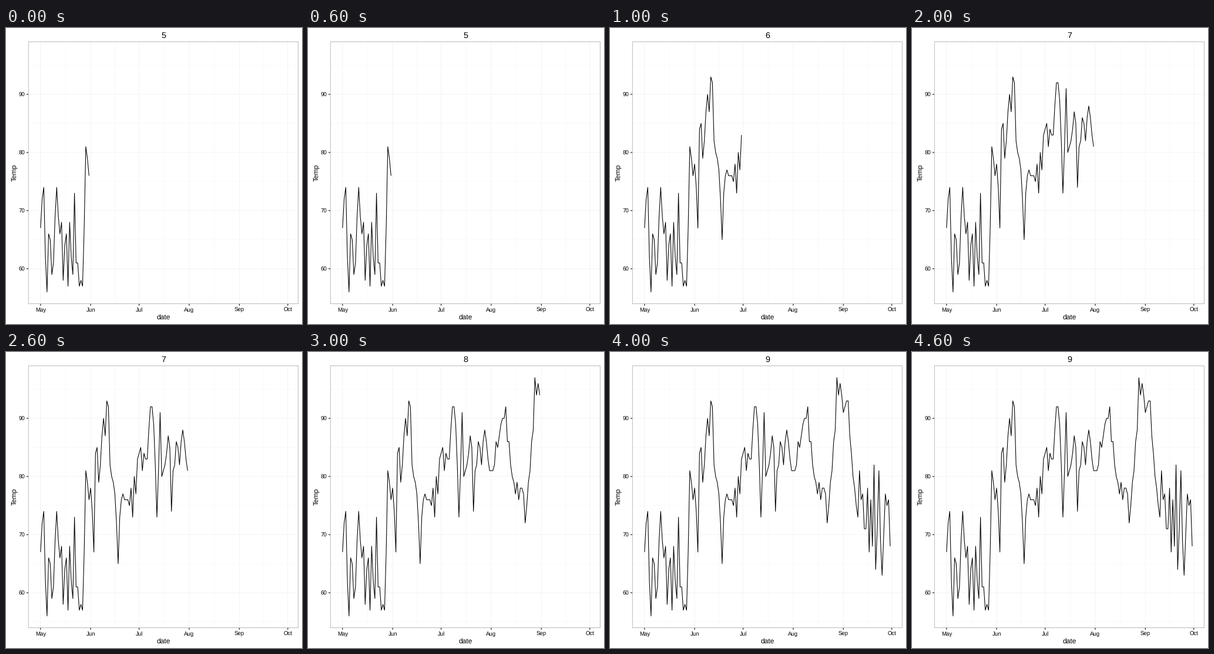
Recreate the animation shown at these times as a matplotlib script. Size 504 by 504 pixels, loop 5000 ms.

```python
import matplotlib.pyplot as plt
import numpy as np
from matplotlib.animation import FuncAnimation
from matplotlib.patches import Rectangle

plt.rcParams.update({
    "font.family": "Liberation Sans",
    "text.hinting": "none",
    "path.snap": False,
    "toolbar": "None",
})

SIZE, DPI = 504, 72
LEFT, RIGHT, TOP, BOTTOM = 37.9, 498.0, 23.4, 469.8
LINE = 1.07

# Daily temperatures, one list per month
may = [67, 72, 74, 62, 56, 66, 65, 59, 61, 69, 74, 69, 66, 68, 58, 64,
       66, 57, 68, 62, 59, 73, 61, 61, 57, 58, 57, 67, 81, 79, 76]
june = [78, 74, 67, 84, 85, 79, 82, 87, 90, 87, 93, 92, 82, 80, 79,
        77, 72, 65, 73, 76, 77, 76, 76, 76, 75, 78, 73, 80, 77, 83]
july = [84, 85, 81, 84, 83, 83, 88, 92, 92, 89, 82, 73, 81, 91, 80, 81,
        82, 84, 87, 85, 74, 81, 82, 86, 85, 82, 86, 88, 86, 83, 81]
august = [81, 81, 82, 86, 85, 87, 89, 90, 90, 92, 86, 86, 82, 80, 79, 77,
          79, 76, 78, 78, 77, 72, 75, 79, 81, 86, 88, 97, 94, 96, 94]
september = [91, 92, 93, 93, 87, 84, 80, 78, 75, 73, 81, 76, 77, 71, 71,
             78, 67, 76, 68, 82, 64, 71, 81, 69, 63, 70, 77, 75, 76, 68]

months = (may, june, july, august, september)
temps = np.concatenate(months)
starts = np.cumsum([0] + [len(m) for m in months])
days = np.arange(len(temps))


def scale(values, data, lo, hi):
    """Map data to pixels, leaving 5% of the range free at both ends."""
    pad = 0.05 * np.ptp(data)
    a, b = data.min() - pad, data.max() + pad
    return lo + (np.asarray(values) - a) / (b - a) * (hi - lo)


def px(day):
    return scale(day, days, LEFT, RIGHT)


def py(temp):
    return scale(temp, temps, BOTTOM, TOP)


fig = plt.figure(figsize=(SIZE / DPI, SIZE / DPI), dpi=DPI, facecolor="white")
ax = fig.add_axes([0, 0, 1, 1])
ax.set(xlim=(0, SIZE), ylim=(SIZE, 0))
ax.axis("off")


def stroke(x, y, color="black", width=LINE):
    return ax.plot(x, y, color=color, lw=width, snap=False,
                   solid_capstyle="butt", solid_joinstyle="round")[0]


def label(x, y, text, size, ha="center", **kw):
    return ax.text(x, y, text, fontsize=size, ha=ha, va="baseline", **kw)


def grid(xs, ys, color, width):
    for y in ys:
        stroke([LEFT, RIGHT], [y, y], color, width)
    for x in xs:
        stroke([x, x], [TOP, BOTTOM], color, width)


month_x = px(starts)
ticks = np.arange(60, 91, 10)
grid(px((starts[:-1] + starts[1:]) / 2), py(np.arange(55, 96, 10)), "0.98", LINE)
grid(month_x, py(ticks), "0.9", 0.43)

line = stroke([], [])

# Only the inner half of the border shows
half = LINE / 2
ax.add_patch(Rectangle((LEFT + half / 2, TOP + half / 2),
                       RIGHT - LEFT - half, BOTTOM - TOP - half,
                       fill=False, ec="0.5", lw=half, snap=False, zorder=3))

for x, name in zip(month_x, ("May", "Jun", "Jul", "Aug", "Sep", "Oct")):
    stroke([x, x], [BOTTOM, BOTTOM + 3])
    label(x, 483.2, name, 9.6)
for t in ticks:
    y = py(t)
    stroke([LEFT - 3, LEFT], [y, y])
    label(32.3, y + 3.5, str(t), 9.6, ha="right")

center = (LEFT + RIGHT) / 2
label(center, 496, "date", 12)
ax.text(16.9, (TOP + BOTTOM) / 2, "Temp", fontsize=12, rotation=90,
        rotation_mode="anchor", ha="center", va="baseline")
title = label(center, 17.2, "", 14.4)


def update(i):
    n = starts[i + 1]
    line.set_data(px(days[:n]), py(temps[:n]))
    title.set_text(str(i + 5))
    return line, title


anim = FuncAnimation(fig, update, frames=len(months), interval=1000,
                     repeat=True, repeat_delay=0)
plt.show()
```
